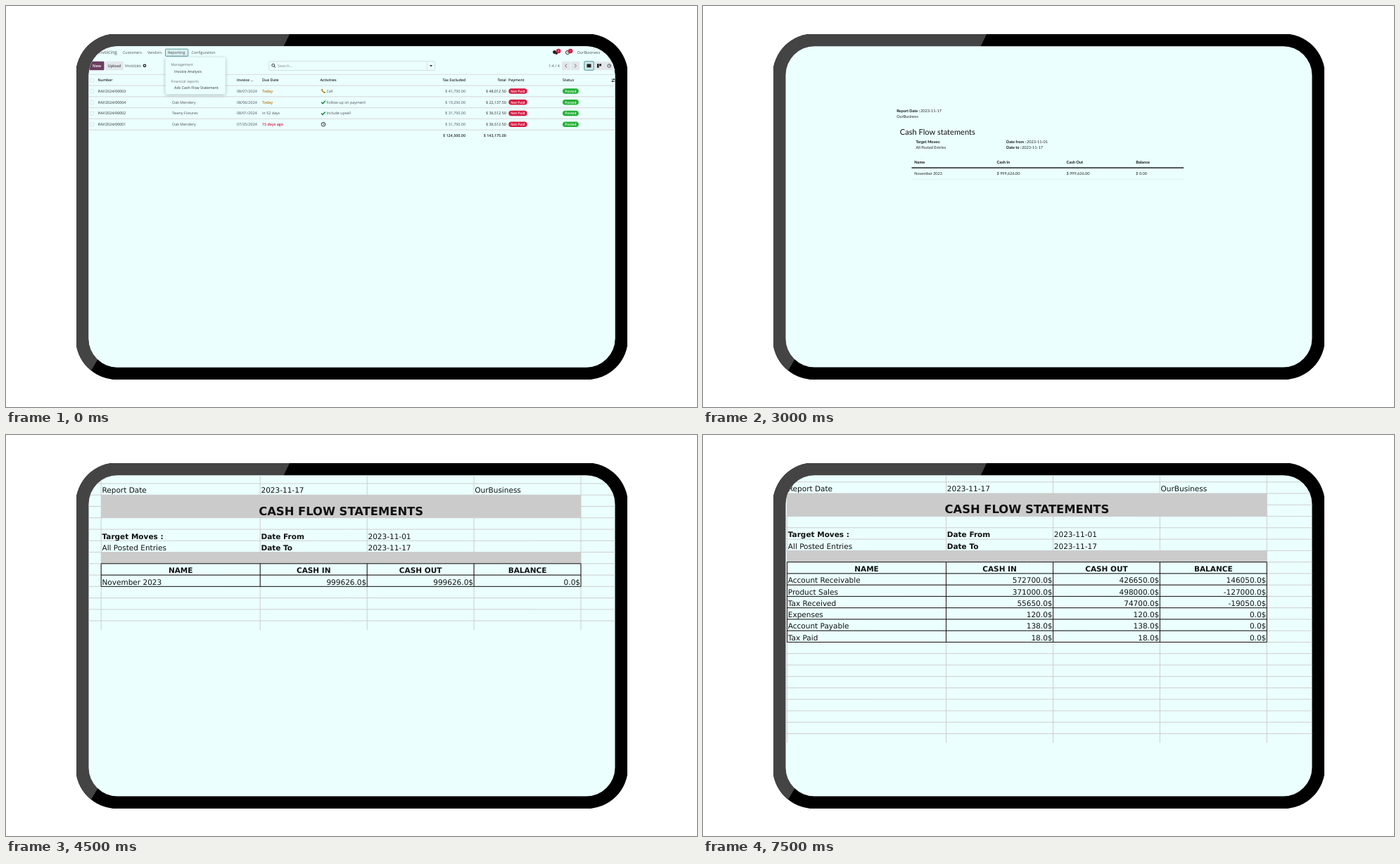
An HTML page with a canvas that plays this animation: 982x570 px, repeating every 8000 ms.

```html
<!DOCTYPE html>
<html lang="en">
<head>
<meta charset="utf-8">
<title>Cash flow reports on a tablet</title>
<style>
html, body { margin: 0; width: 100%; height: 100%; overflow: hidden; background: #fff; }
canvas { display: block; width: 982px; height: 570px; }
</style>
</head>
<body>
<canvas id="stage"></canvas>
<script>
const W = 982, H = 570, LOOP = 8000, STEP = 1500;
const CYAN = '#ebffff', PURPLE = '#6b3e60', TEAL = '#2c8583';
const UI = '"Open Sans", "Noto Sans", sans-serif';
const DOC = 'Lato, sans-serif';
const GRID = '"DejaVu Sans", sans-serif';
const CLIENT_A = 'Oak Mendery', CLIENT_B = 'Tawny Fixtures', OWNER = 'OurBusiness';

const canvas = document.getElementById('stage');
const g = canvas.getContext('2d');
const ratio = window.devicePixelRatio || 1;
canvas.width = W * ratio;
canvas.height = H * ratio;
g.scale(ratio, ratio);

// y is the middle of the capital letters
function text(str, x, y, size, { font = UI, weight = 400, color = '#333', align = 'left' } = {}) {
  g.font = `${weight} ${size}px ${font}`;
  g.textRendering = 'geometricPrecision';
  g.textAlign = align;
  g.fillStyle = color;
  g.fillText(str, x, y + size * 0.36);
}

function rect(x1, y1, x2, y2, color) {
  g.fillStyle = color;
  g.fillRect(x1, y1, x2 - x1, y2 - y1);
}

function round(x1, y1, x2, y2, r, fill, stroke, width = 1) {
  g.beginPath();
  g.roundRect(x1, y1, x2 - x1, y2 - y1, r);
  if (fill) { g.fillStyle = fill; g.fill(); }
  if (stroke) { g.strokeStyle = stroke; g.lineWidth = width; g.stroke(); }
}

function line(points, color, width = 1) {
  g.beginPath();
  points.forEach(([x, y]) => g.lineTo(x, y));
  g.strokeStyle = color;
  g.lineWidth = width;
  g.stroke();
}

const hline = (x1, x2, y, color, width) => line([[x1, y], [x2, y]], color, width);
const vline = (x, y1, y2, color, width) => line([[x, y1], [x, y2]], color, width);

function disc(x, y, r, fill, stroke, width = 1) {
  g.beginPath();
  g.arc(x, y, r, 0, Math.PI * 2);
  if (fill) { g.fillStyle = fill; g.fill(); }
  if (stroke) { g.strokeStyle = stroke; g.lineWidth = width; g.stroke(); }
}

function clock(x, y, r, color) {
  disc(x, y, r, null, color, 0.9);
  line([[x, y - r * 0.6], [x, y], [x + r * 0.5, y]], color, 0.7);
}

function tick(x, y, color) {
  line([[x - 2.8, y], [x - 0.9, y + 1.9], [x + 2.8, y - 1.9]], color, 1.5);
}

function phone(x, y, color) {
  g.beginPath();
  g.moveTo(x - 2.2, y - 2.4);
  g.quadraticCurveTo(x - 1.6, y + 1.6, x + 2.4, y + 2.2);
  g.strokeStyle = color;
  g.lineWidth = 1.2;
  g.stroke();
  disc(x - 1.7, y - 1.9, 1, color);
  disc(x + 1.9, y + 1.7, 1, color);
}

const NORMAL = {
  bg: CYAN, ink: '#222', soft: '#4a4d52', rule: '#dddcdc', chip: '#e3e7eb', box: '#d3dde0',
  main: PURPLE, mainInk: '#fff', red: '#d8163f', green: '#22b034', pillInk: '#fff',
  today: '#b8770f', late: '#d4173c', ok: '#0b8a35', on: '#d2e9ea', badge: '#dc1640'
};
const DIMMED = {
  bg: '#777777', ink: '#171717', soft: '#252525', rule: '#686868', chip: '#838383', box: '#686868',
  main: '#6c2344', mainInk: '#c3a3b1', red: '#a8304f', green: '#2c7b4a', pillInk: '#d2b5bd',
  today: '#6a470b', late: '#8c1430', ok: '#0a4b25', on: '#6f8686', badge: '#e2234b'
};

const INVOICES = [
  ['INV/2024/00003', CLIENT_A, '08/07/2024', 'Today', 'Call', '$ 41,750.00', '$ 48,012.50'],
  ['INV/2024/00004', CLIENT_A, '08/06/2024', 'Today', 'Follow-up on payment', '$ 19,250.00', '$ 22,137.50'],
  ['INV/2024/00002', CLIENT_B, '08/01/2024', 'In 52 days', 'Include upsell', '$ 31,750.00', '$ 36,512.50'],
  ['INV/2024/00001', CLIENT_A, '07/25/2024', '15 days ago', '', '$ 31,750.00', '$ 36,512.50']
];

function topBars(c, dim) {
  const item = { color: c.soft };
  text('Invoicing', 130.5, 66, 6.6, item);
  if (!dim) round(226.5, 61.2, 258.8, 71.3, 1, '#d9efef', '#4d8f90', 0.9);
  text('Customers', 166, 66, 5.35, item);
  text('Vendors', 201, 66, 5.35, item);
  text('Reporting', 230, 66, 5.35, item);
  text('Configuration', 263.5, 66, 5.35, item);

  disc(779.6, 65.6, 2.5, c.ink);
  disc(782.2, 67.2, 1.8, c.ink);
  clock(798.2, 66, 2.7, c.ink);
  [[785.2, '4'], [802.2, '1']].forEach(([x, n]) => {
    disc(x, 64, 3.2, c.badge);
    if (!dim) text(n, x, 64, 3.6, { color: '#fff', align: 'center' });
  });
  text(OWNER, 811.5, 66, 5.5, item);

  round(118, 78.8, 139.5, 91.2, 1.2, c.main);
  text('New', 129, 85, 5.5, { weight: 600, color: c.mainInk, align: 'center' });
  round(141, 78.8, 167, 91.2, 1.2, c.chip);
  text('Upload', 154, 85, 5.4, { weight: 600, color: c.soft, align: 'center' });
  text('Invoices', 169, 85, 6.1, item);
  disc(197, 84.8, 1.7, null, c.ink, 1.3);

  round(373.5, 78.5, 609.5, 91.5, 1.2, null, c.box, 0.9);
  vline(598.2, 78.5, 91.5, c.box, 0.9);
  disc(379.7, 84.2, 1.9, null, c.ink, 0.9);
  line([[381, 85.6], [383, 87.5]], c.ink, 1);
  text('Search...', 386, 85, 5.35, { color: dim ? '#444' : '#858a90' });
  g.beginPath();
  g.moveTo(602, 84); g.lineTo(606, 84); g.lineTo(604, 86.3);
  g.fillStyle = c.ink;
  g.fill();

  text('1-4 / 4', 771, 85, 5.4, item);
  round(790, 78.8, 802.3, 91.2, 1, c.chip);
  round(803, 78.8, 815.3, 91.2, 1, c.chip);
  line([[797, 82.4], [794.6, 85], [797, 87.6]], c.soft, 0.8);
  line([[808, 82.4], [810.4, 85], [808, 87.6]], c.soft, 0.8);
  round(836, 78.8, 865, 91.2, 1, c.chip);
  round(821.8, 78.8, 835.2, 91.2, 1, c.on, '#398a8c', 0.9);
  rect(825.5, 82.4, 831.5, 87.4, c.ink);
  rect(840, 82.2, 842.6, 87.8, c.ink);
  rect(843.2, 82.2, 846, 85.4, c.ink);
  clock(857.2, 85, 2.4, c.soft);
}

function pill(label, x1, x2, y, color, ink) {
  round(x1, y - 3.8, x2, y + 3.8, 3.8, color);
  text(label, (x1 + x2) / 2, y, 4.9, { weight: 600, color: ink, align: 'center' });
}

function invoiceTable(c) {
  const head = { weight: 600, color: c.ink }, body = { color: c.soft };
  const right = o => ({ ...o, align: 'right' });
  hline(118, 866, 97.4, c.rule);
  [['Number', 130.5], ['Customer', 236], ['Invoice ...', 328], ['Due Date', 364],
   ['Activities', 446.5], ['Payment', 714], ['Status', 791]]
    .forEach(([label, x]) => text(label, x, 105.4, 5.25, head));
  text('Tax Excluded', 653, 105.4, 5.25, right(head));
  text('Total', 710.8, 105.4, 5.25, right(head));
  round(119.6, 103, 124.8, 108.2, 1, null, c.box, 0.7);
  hline(860.5, 866, 104.2, c.ink, 0.8);
  hline(860.5, 866, 107, c.ink, 0.8);
  disc(864, 104.2, 1, c.ink);
  disc(862, 107, 1, c.ink);

  INVOICES.forEach(([number, client, date, due, activity, net, total], i) => {
    const y = 121 + i * 15.75;
    hline(118, 866, y - 7.8, c.rule, 1.2);
    round(119.6, y - 2.4, 124.8, y + 2.8, 1, null, c.box, 0.7);
    text(number, 130.5, y, 5.3, { color: c.ink });
    text(client, 236, y, 5.35, body);
    text(date, 328, y, 5.45, body);
    const dueColor = due === 'Today' ? c.today : i === 3 ? c.late : c.soft;
    text(due, 364, y, 5.35, { color: dueColor, weight: i === 2 ? 400 : 600 });
    if (i === 0) phone(451, y, c.today);
    else if (i === 3) clock(451, y, 2.8, c.ink);
    else tick(451, y, c.ok);
    text(activity, 455.5, y, 5.35, body);
    text(net, 653, y, 5.4, right(body));
    text(total, 710.8, y, 5.4, right({ color: c.ink }));
    pill('Not Paid', 714.3, 740.6, y, c.red, c.pillInk);
    pill('Posted', 791, 813.8, y, c.green, c.pillInk);
  });
  hline(118, 866, 176.2, c.rule, 1.2);
  text('$ 124,500.00', 653, 184, 5.4, right(head));
  text('$ 143,175.00', 710.8, 184, 5.4, right(head));
}

function invoiceList(dim) {
  const c = dim ? DIMMED : NORMAL;
  rect(117, 56, 867, 515, c.bg);
  g.save();
  if (dim) g.translate(0, -1.2);
  topBars(c, dim);
  invoiceTable(c);
  g.restore();
}

function reportMenu() {
  invoiceList(false);
  g.save();
  g.shadowColor = 'rgba(0,0,0,.28)';
  g.shadowBlur = 5 * ratio;
  g.shadowOffsetY = ratio;
  round(226.5, 73, 311.8, 125.5, 1.5, CYAN);
  g.restore();
  text('Management', 234.5, 83.3, 5.1, { color: '#6a6e73' });
  text('Invoice Analysis', 239, 93, 5.35);
  text('Financial reports', 234.5, 106.8, 5.1, { color: '#6a6e73' });
  text('Adv Cash Flow Statement', 239, 116.2, 5.35);
}

function reportDialog() {
  invoiceList(true);
  round(298.5, 183.4, 684.8, 295.5, 1, CYAN, '#666', 0.6);
  text('Cash Flow Statements', 305, 195.2, 6.2, { weight: 600, color: '#222' });
  line([[672.8, 192.6], [678, 197.8]], '#444', 0.8);
  line([[678, 192.6], [672.8, 197.8]], '#444', 0.8);
  hline(298.5, 684.8, 206.6, '#d8e0e2', 0.9);
  hline(298.5, 684.8, 270.2, '#d8e0e2', 0.9);

  [['Start Date', 305, 220.5, 333], ['Target Moves', 305, 235, 340.8],
   ['End Date', 498, 220.5, 522.3], ['Levels', 498, 235, 515.3]].forEach(([label, x, y, mark]) => {
    text(label, x, y, 5.3, { weight: 600, color: '#222' });
    text('?', mark, y - 2.3, 3.8, { color: TEAL });
  });
  text('05/01/2024', 350, 220.5, 5.45);
  text('08/09/2024', 532, 220.5, 5.45);
  text('Summary', 532, 235.5, 5.35);
  disc(353.3, 235, 2.8, TEAL);
  disc(353.3, 235, 1.1, CYAN);
  disc(353.3, 247.2, 2.6, null, '#cfdadc', 0.7);
  text('All Posted Entries', 359, 235, 5.35);
  text('All Entries', 359, 247.2, 5.35);

  [['PDF', 305, 324, PURPLE, '#fff'], ['Excel', 325.5, 347.3, PURPLE, '#fff'],
   ['Cancel', 348.8, 375, '#e5e7eb', '#333']].forEach(([label, x1, x2, fill, color]) => {
    round(x1, 276.3, x2, 289.2, 1.2, fill);
    text(label, (x1 + x2) / 2, 282.7, 5.4, { weight: 600, color, align: 'center' });
  });
}

const plain = { font: DOC, color: '#222' };
const strong = { font: DOC, color: '#111', weight: 700 };

function shortReport() {
  const size = 5.55;
  text('Report Date :', 275.2, 148.6, size, strong);
  text('2023-11-17', 309, 148.6, size, plain);
  text(OWNER, 275.2, 157, size, plain);
  text('Cash Flow statements', 279.8, 179.2, 11.1, { font: DOC, color: '#111' });
  text('Target Moves:', 302.4, 192.8, size, strong);
  text('All Posted Entries', 302.4, 201.2, size, plain);
  text('Date from :', 431, 192.8, size, strong);
  text('2023-11-01', 460, 192.8, size, plain);
  text('Date to :', 431, 201.2, size, strong);
  text('2023-11-17', 453, 201.2, size, plain);
  [['Name', 'November 2023', 300.3], ['Cash In', '$ 999,626.00', 417.5],
   ['Cash Out', '$ 999,626.00', 516.5], ['Balance', '$ 0.00', 615.3]].forEach(([head, value, x]) => {
    text(head, x, 221.6, 5.7, strong);
    text(value, x, 238.4, size, plain);
  });
  hline(296.5, 683, 230, '#1d2023', 1.7);
  hline(296.5, 683, 246.4, '#d9e6e7', 0.7);
}

const ACCOUNTS = [
  ['Product Sales', '466,250.00', '503,000.00', '-36,750.00'],
  ['Bank Suspense Account', '65.16', '19,954.90', '-19,889.74'],
  ['Account Receivable', '577,700.00', '541,187.50', '36,512.50'],
  ['Expenses', '120.00', '120.00', '0.00'],
  ['Bank', '24,954.90', '65.16', '24,889.74'],
  ['Account Payable', '138.00', '138.00', '0.00'],
  ['Tax Paid', '18.00', '18.00', '0.00'],
  ['Tax Received', '69,937.50', '74,700.00', '-4,762.50']
];

function fullReport() {
  const size = 7.25, top = 9.5, cols = [519, 616.5, 712];
  rect(117, 56, 212.2, 515, '#2a2a29');
  rect(769.2, 56, 867, 515, '#2a2a29');
  text('2024-03-30 14:23', 239.8, 71.3, top, plain);
  text('My Trading (Old', 490.4, 71.3, top, { ...plain, align: 'center' });
  text('Ferrimoor)', 490.4, 86, top, { ...plain, align: 'center' });
  ['1', '/', '1'].forEach((s, i) => text(s, 715.4 + i * 11.2, 71.3, top, { ...plain, align: 'center' }));

  text('Report Date :', 239.8, 162.3, size, strong);
  text('2024-03-30', 283.2, 162.3, size, plain);
  text('My Trading (Old Ferrimoor)', 239.8, 173.3, size, plain);
  text('Cash Flow statements', 246, 197.5, 14.45, { font: DOC, color: '#111' });
  text('Target Moves:', 265, 215.3, size, strong);
  text('All Posted Entries', 265, 226, size, plain);
  text('Date from :', 415.5, 215.3, size, strong);
  text('2023-09-12', 452.3, 215.3, size, plain);
  text('Date to :', 415.5, 226, size, strong);
  text('2024-03-30', 443.3, 226, size, plain);

  text('Name', 270, 242.3, 7.6, strong);
  ['Cash In', 'Cash Out', 'Balance'].forEach((s, i) =>
    text(s, cols[i], 242.3, 7.6, { ...strong, align: 'right' }));
  ACCOUNTS.forEach(([name, ...values], i) => {
    const y = 262 + i * 22.17;
    hline(265, 716.5, y - 11.2, '#22272a', 1.7);
    text(name, 270, y, 7.75, plain);
    values.forEach((v, k) => text('$ ' + v, cols[k], y, 7.75, { ...plain, align: 'right' }));
  });
  hline(265, 716.5, 428.3, '#d9e6e7', 0.8);
}

function sheet(left, top, lines, rows) {
  const pitch = 16.26, size = 10.5, faint = '#cdc8c8', bar = '#cbcbcb';
  const xs = [0, 226, 378, 529.8, 681.8].map(d => left + d);
  const end = xs[4];
  const rowY = n => top + n * pitch;
  const cell = (str, col, row, weight = 400) =>
    text(str, xs[col] + 1.3, rowY(row) + 9.7, size, { font: GRID, color: '#111', weight });

  for (let i = 0; i < lines; i++) hline(117, 866, rowY(i), faint, 0.9);
  xs.forEach(x => vline(x, 56, rowY(lines - 1) + 13, faint, 0.9));
  rect(left, rowY(1), end, rowY(3), bar);
  rect(left, rowY(6), end, rowY(7), bar);

  cell('Report Date', 0, 0);
  cell('2023-11-17', 1, 0);
  cell(OWNER, 3, 0);
  text('CASH FLOW STATEMENTS', (left + end) / 2, rowY(2) + 6.2, 16.35,
    { font: GRID, weight: 700, color: '#111', align: 'center' });
  cell('Target Moves :', 0, 4, 700);
  cell('Date From', 1, 4, 700);
  cell('2023-11-01', 2, 4);
  cell('All Posted Entries', 0, 5);
  cell('Date To', 1, 5, 700);
  cell('2023-11-17', 2, 5);

  ['NAME', 'CASH IN', 'CASH OUT', 'BALANCE'].forEach((s, i) =>
    text(s, (xs[i] + xs[i + 1]) / 2, rowY(7) + 9.5, size,
      { font: GRID, weight: 700, color: '#111', align: 'center' }));
  rows.forEach(([name, ...values], i) => {
    cell(name, 0, 8 + i);
    values.forEach((v, k) => text(v + '.0$', xs[k + 2] - 1, rowY(8 + i) + 9.7, size,
      { font: GRID, color: '#111', align: 'right' }));
  });
  const last = 8 + rows.length;
  for (let i = 7; i <= last; i++) hline(left, end, rowY(i), '#151515', 1);
  xs.forEach(x => vline(x, rowY(7), rowY(last), '#151515', 1));
}

const shortSheet = () => sheet(135.2, 69, 13, [['November 2023', 999626, 999626, 0]]);
const fullSheet = () => sheet(119.5, 66.8, 23, [
  ['Account Receivable', 572700, 426650, 146050],
  ['Product Sales', 371000, 498000, -127000],
  ['Tax Received', 55650, 74700, -19050],
  ['Expenses', 120, 120, 0],
  ['Account Payable', 138, 138, 0],
  ['Tax Paid', 18, 18, 0]
]);

const SCENES = [reportMenu, reportDialog, shortReport, shortSheet, fullReport, fullSheet];

function tablet() {
  g.save();
  g.beginPath();
  g.rect(100, 40, 783, 491);
  g.clip();
  g.beginPath();
  g.roundRect(99, 39.3, 785, 492, 59);
  g.clip();
  rect(99, 39, 884, 532, '#000');
  g.beginPath();
  [[90, 30], [407, 30], [403, 40], [394.6, 57.5], [130.5, 502], [122, 516.5], [112, 532], [90, 532]]
    .forEach(([x, y]) => g.lineTo(x, y));
  g.fillStyle = '#444';
  g.fill();
  g.restore();
}

function draw(scene) {
  rect(0, 0, W, H, '#fff');
  tablet();
  g.save();
  g.beginPath();
  g.roundRect(117.5, 57.2, 748, 456.4, 41);
  g.clip();
  rect(117, 56, 867, 515, CYAN);
  SCENES[scene]();
  g.restore();
}

function tick60() {
  draw(Math.floor((performance.now() % LOOP) / STEP));
  requestAnimationFrame(tick60);
}
tick60();
</script>
</body>
</html>
```
